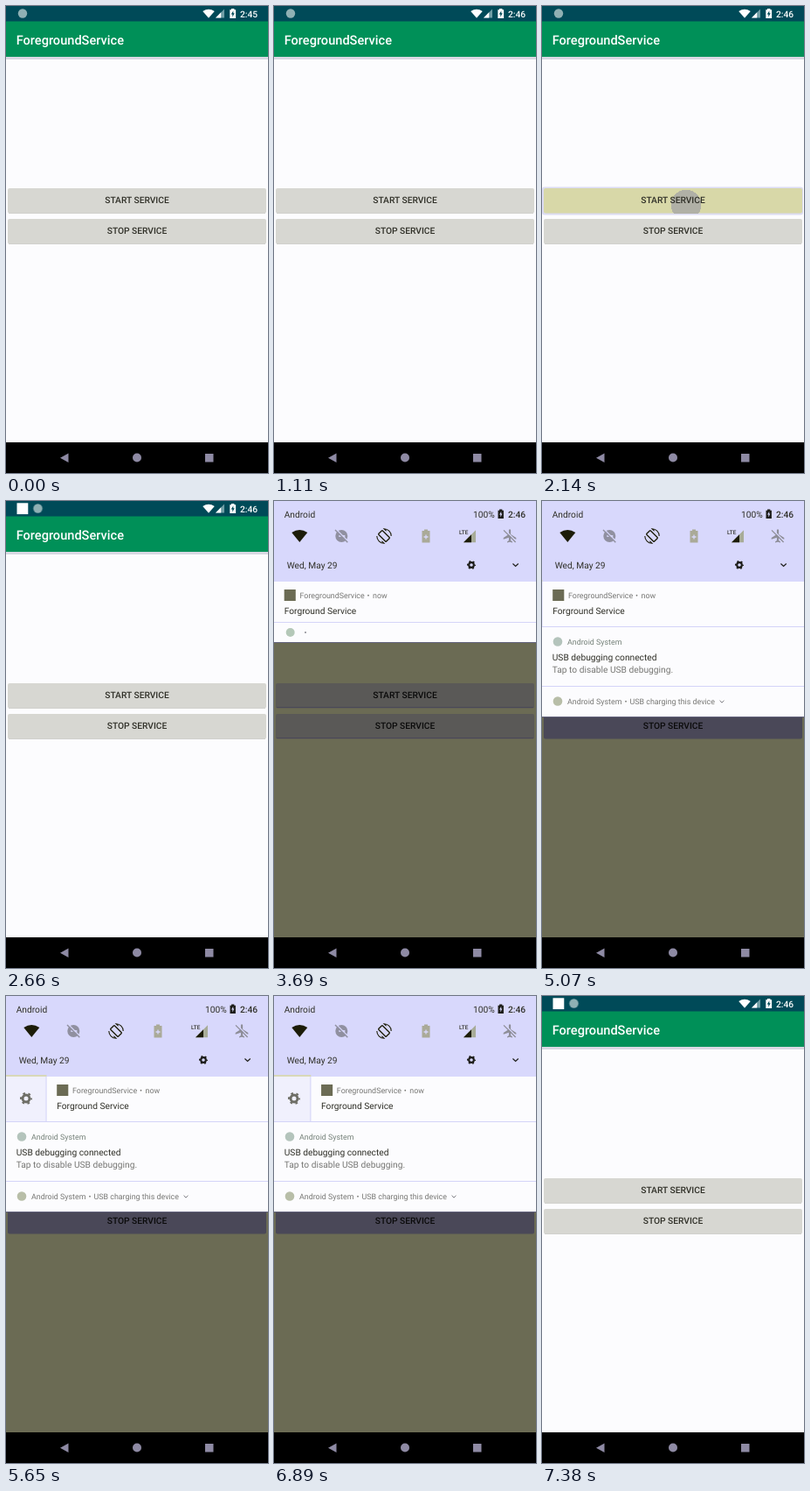
An HTML page for the animation above (8000 ms loop, 300 by 533 pixels).

```html
<!DOCTYPE html>
<html lang="en">
<head>
<meta charset="utf-8">
<title>Foreground service</title>
<style>
/* --h: shade height, --q: quick settings stretch, --dx: card swipe */
@property --h { syntax: "<number>"; inherits: true; initial-value: 0; }
@property --q { syntax: "<number>"; inherits: true; initial-value: 0; }
@property --dx { syntax: "<number>"; inherits: true; initial-value: 0; }

html, body { margin: 0; width: 100%; height: 100%; overflow: hidden; background: #000; }
#stage {
  position: relative; width: 300px; height: 533px; overflow: hidden;
  animation: shade 8s linear infinite, stretch 8s linear infinite, swipe 8s linear infinite;
}
svg { position: absolute; left: 0; top: 0; display: block; }
text {
  font: 400 10.22px Roboto, sans-serif; fill: #303028;
  white-space: pre; text-rendering: geometricPrecision;
}
.med { font-weight: 500; }
.title { font-size: 14.6px; font-weight: 500; fill: #fff; }
.small { font-size: 8.9px; fill: #777774; }
.mid { text-anchor: middle; }
.white { fill: #fff; }

@keyframes shade {
  0%, 44.5% { --h: 0; }
  46.125% { --h: 161; animation-timing-function: ease-out; }
  47.875%, 86.625% { --h: 247; animation-timing-function: cubic-bezier(.3, 0, .4, 1); }
  92%, 100% { --h: 0; }
}
@keyframes stretch {
  0%, 47.875% { --q: 0; animation-timing-function: ease-out; }
  49.75%, 50.25% { --q: 1; animation-timing-function: ease-in-out; }
  52.875%, 100% { --q: 0; }
}
@keyframes swipe {
  0%, 63.375% { --dx: 0; animation-timing-function: ease-out; }
  66.25% { --dx: 68; }
  68.125% { --dx: 72; animation-timing-function: ease-out; }
  70.625%, 76.125% { --dx: 46.5; animation-timing-function: ease-out; }
  80% { --dx: 84; animation-timing-function: ease-in-out; }
  83.5%, 86.06% { --dx: 46.5; }
  86.125% { --dx: 42.7; animation-timing-function: ease-out; }
  88.75%, 100% { --dx: 0; }
}

#early { animation: early 8s steps(1) infinite; }
#late { animation: late 8s steps(1) infinite; }
@keyframes early { 0% { opacity: 1; } 10.5%, 100% { opacity: 0; } }
@keyframes late { 0% { opacity: 0; } 10.5%, 100% { opacity: 1; } }

#press { opacity: 0; animation: press 8s linear infinite; }
@keyframes press {
  0%, 24.5% { opacity: 0; }
  25.75%, 30% { opacity: 1; }
  33.25%, 100% { opacity: 0; }
}
#ripple { transform-origin: 165px 227px; animation: ripple 8s linear infinite; }
@keyframes ripple {
  0%, 24.5% { transform: scale(0); opacity: 1; }
  26.75% { transform: scale(1); opacity: 1; }
  29.4% { transform: scale(4.5); opacity: .8; }
  32%, 100% { transform: scale(10); opacity: 0; }
}
#note { animation: note 8s linear infinite; }
#sys { animation: sys 8s ease-in-out infinite; }
@keyframes note { 0%, 29.5% { opacity: 0; } 32%, 100% { opacity: 1; } }
@keyframes sys {
  0%, 29.5% { transform: translateX(0); }
  32%, 100% { transform: translateX(17.5px); }
}

#scrim { opacity: min(1, calc(var(--h) / 160)); }
.dim { fill: #5a5957; animation: dim 8s steps(1) infinite; }
@keyframes dim { 0% { fill: #5a5957; } 50%, 100% { fill: #4a4858; } }
#panel {
  position: absolute; left: 0; top: 0; width: 300px; overflow: hidden;
  height: calc((var(--h) + 38 * var(--q)) * 1px);
}
.drop { transform: translateY(calc(var(--q) * 38px)); }
.edge { transform: translateY(calc((var(--h) + 38 * var(--q)) * 1px)); }
.shelf { opacity: clamp(0, calc((247 - var(--h)) / 10), 1); }
#head { transform: translateY(min(0px, calc((var(--h) - 92) * 1px))); }
#card { transform: translateX(calc(var(--dx) * 1px)); }
#menu { opacity: clamp(0, calc(var(--dx) / 40), 1); }
#lip { width: calc(var(--dx) * 1px); }
.tile {
  transform: translate(calc((var(--x) + var(--mx) * var(--q)) * 1px),
                       calc((40 + var(--my) * var(--q)) * 1px));
}
</style>
</head>
<body>
<div id="stage">
  <svg width="300" height="533" viewBox="0 0 300 533">
    <defs>
      <clipPath id="btn"><rect x="2" y="208" width="296" height="28.5" rx="2"/></clipPath>
      <g id="gear" fill="none" stroke="currentColor">
        <circle r="3" stroke-width="2.2"/>
        <circle r="4.5" stroke-width="1.6" stroke-dasharray="2 2.712" stroke-dashoffset="1"/>
      </g>
      <path id="wifi" d="M0 7L-9-4Q0-10 9-4Z"/>
      <path id="cell" d="M-2-10h4v1.2h2v9.8h-8v-9.8h2Z"/>
      <path id="bolt" d="M.6-7.5L-2-3.6h1.6V-.6L2-4.8H.6Z"/>
      <path id="more" d="M-3.5-1.7L0 1.7L3.5-1.7" fill="none" stroke-width="1.3"/>
    </defs>

    <rect width="300" height="533" fill="#fcfcfe"/>
    <rect y="58" width="300" height="3" fill="#d8d8e2"/>
    <rect y="17" width="300" height="41" fill="#009058"/>
    <rect width="300" height="17.5" fill="#004a58"/>
    <text class="title" x="11.7" y="44">ForegroundService</text>

    <rect id="note" class="white" x="12.5" y="2.3" width="12.8" height="12.8"/>
    <circle id="sys" cx="19" cy="8.5" r="5.2" fill="#8fb0b4"/>
    <use href="#wifi" class="white" transform="translate(232 8.8) scale(.75 .72)"/>
    <path d="M240 13.5h10v-10z" fill="#6f9da5"/>
    <path class="white" d="M240 13.5h6.2v-6.2z"/>
    <use href="#cell" class="white" transform="translate(259.7 13) scale(.85 1)"/>
    <use href="#bolt" fill="#004a58" transform="translate(259.7 13)"/>
    <text id="early" class="med white" x="268" y="12.6">2:45</text>
    <text id="late" class="med white" x="268" y="12.6">2:46</text>

    <g fill="#d7d7d2">
      <rect x="2" y="208" width="296" height="28.5" rx="2"/>
      <rect x="2" y="243" width="296" height="28.5" rx="2"/>
    </g>
    <path d="M3 236.5H297M3 271.5H297" stroke="#d0d0cc"/>
    <g id="press">
      <rect x="0" y="206.5" width="299" height="32" rx="3" fill="#dcdcf2"/>
      <rect x="2" y="208" width="296" height="28.5" rx="2" fill="#d8d8a8"/>
      <g clip-path="url(#btn)"><circle id="ripple" cx="165" cy="227" r="17" fill="#b0b0a6"/></g>
    </g>
    <text class="med mid" x="150" y="225.3">START SERVICE</text>
    <text class="med mid" x="150" y="260.3">STOP SERVICE</text>

    <g id="scrim">
      <rect width="300" height="498" fill="#6b6b54"/>
      <rect y="17" width="300" height="41" fill="#003d28"/>
      <rect width="300" height="17.5" fill="#002028"/>
      <rect class="dim" x="2" y="208" width="296" height="28.5" rx="2"/>
      <rect class="dim" x="2" y="243" width="296" height="28.5" rx="2"/>
      <path d="M3 235.5H297M3 270.5H297" stroke="#4a4858"/>
      <text class="med mid" x="150" y="225.3" style="fill:#0a0a0a">START SERVICE</text>
      <text class="med mid" x="150" y="260.3" style="fill:#0a0a0a">STOP SERVICE</text>
    </g>

    <rect y="498" width="300" height="35" fill="#000"/>
    <g fill="#8e8aa4">
      <path d="M62 515.7L71.5 510.5V521Z"/>
      <circle cx="150" cy="515.5" r="5"/>
      <rect x="228" y="511" width="9.5" height="9.5"/>
    </g>
  </svg>

  <div id="panel">
    <svg width="300" height="533" viewBox="0 0 300 533">
      <g class="drop">
        <rect y="92" width="300" height="155" fill="#fcfcfe"/>

        <g id="menu">
          <rect y="92" width="300" height="51" fill="#f0f0fd"/>
          <use href="#gear" color="#6e6e66" transform="translate(23 117) scale(1.32)"/>
        </g>
        <g id="card">
          <rect y="92" width="300" height="51" fill="#fcfcfe"/>
          <path d="M-.5 92V143" stroke="#d4d4f8"/>
          <rect x="11.7" y="101" width="13.1" height="13" fill="#6b6b54"/>
          <text class="small" x="29.5" y="111">ForegroundService</text>
          <text class="small" x="106.5" y="111">•</text>
          <text class="small" x="113" y="111">now</text>
          <text x="11.7" y="128.8">Forground Service</text>
        </g>

        <path d="M0 143.5H300M0 211.5H300" stroke="#d4d4f8"/>
        <circle cx="18" cy="160.5" r="5.3" fill="#b4c4bc"/>
        <text class="small" x="29" y="164" style="fill:#748078">Android System</text>
        <text x="11.7" y="182">USB debugging connected</text>
        <text x="11.7" y="196.3" style="fill:#777774">Tap to disable USB debugging.</text>
        <circle cx="18" cy="228.5" r="5.3" fill="#b8bea8"/>
        <text class="small" x="29" y="232">Android System</text>
        <text class="small" x="94.5" y="232">•</text>
        <text class="small" x="100.5" y="232">USB charging this device</text>
        <use href="#more" stroke="#66666c" transform="translate(206 229) scale(.7)"/>
      </g>

      <g class="edge">
        <g class="shelf">
          <rect y="-23.5" width="300" height="23.5" fill="#fcfcfe"/>
          <path d="M0-23.5H300" stroke="#d4d4f8"/>
          <circle cx="18.7" cy="-12" r="5" fill="#b4c8b8"/>
          <circle cx="36" cy="-12" r="1" fill="#8a8a90"/>
        </g>
        <path d="M0-.5H300" stroke="#62627c"/>
      </g>

      <g id="head">
        <g class="drop">
          <rect y="-100" width="300" height="192" fill="#d8d8fc"/>
          <rect id="lip" y="90" height="2" fill="#d8d8b8"/>
        </g>
        <text x="11.7" y="18.5">Android</text>
        <text x="228" y="18.5">100%</text>
        <use href="#cell" fill="#1c1c18" transform="translate(259.7 19) scale(.8 .95)"/>
        <use href="#bolt" fill="#d8d8fc" transform="translate(259.7 19) scale(.8 .95)"/>
        <text class="med" x="268" y="18.5">2:46</text>

        <g class="tile" style="--x:29.3;--mx:1;--my:10">
          <use href="#wifi" fill="#1c1c08"/>
        </g>
        <g class="tile" style="--x:77.3;--mx:2;--my:10">
          <circle r="7" fill="#9090a0"/>
          <path d="M-3 0H4" stroke="#d8d8fc" stroke-width="1.8"/>
          <path d="M-6-7.5L7.5 6" stroke="#d8d8fc" stroke-width="1.4"/>
          <path d="M-7.3-7L7 7.3" stroke="#9090a0" stroke-width="1.4"/>
        </g>
        <g class="tile" style="--x:126;--mx:3;--my:10" fill="none" stroke="#1c1c08" stroke-width="1.3">
          <rect x="-3.2" y="-6.2" width="6.4" height="12.4" rx=".8" transform="rotate(-45)"/>
          <path d="M2.6-5.8L0-8.2A8.2 8.2 0 0 1 8.2 0M-2.6 5.8L0 8.2A8.2 8.2 0 0 1-8.2 0" stroke-width="1.1"/>
        </g>
        <g class="tile" style="--x:174;--mx:-3;--my:29">
          <path d="M-2-7.5h4v1.5h2.5v13.5h-9V-6h2.5Z" fill="#aaaa98"/>
          <path d="M-2.5 1H2.5M0-1.5V3.5" stroke="#d8d8fc" stroke-width="1.3"/>
        </g>
        <g class="tile" style="--x:222;--mx:-2;--my:29">
          <path d="M-5 7.3H9V-6.7Z" fill="#a8ac98"/>
          <path d="M-5 7.3H4V-1.7Z" fill="#1c1c08"/>
          <text class="med" x="-10" y="-1.8" style="font-size:6.4px">LTE</text>
        </g>
        <g class="tile" style="--x:270;--mx:0;--my:29">
          <path d="M-1.1-7Q0-8.5 1.1-7V-2L7.3 2V3.8L1.1 1.8V5L3 6.5V7.6L0 6.8L-3 7.6V6.5L-1.1 5V1.8L-7.3 3.8V2L-1.1-2Z" fill="#8e8e98"/>
          <path d="M-5.6-7L7.4 6" stroke="#d8d8fc" stroke-width="1.3"/>
          <path d="M-7-6.6L6.6 7" stroke="#8e8e98" stroke-width="1.3"/>
        </g>

        <g class="drop">
          <text x="14.7" y="76.7">Wed, May 29</text>
          <use href="#gear" color="#1c1c18" transform="translate(226 73) scale(.95)"/>
          <use href="#more" stroke="#1c1c18" transform="translate(276.6 73) scale(.9)"/>
        </g>
      </g>
    </svg>
  </div>
</div>
</body>
</html>
```
